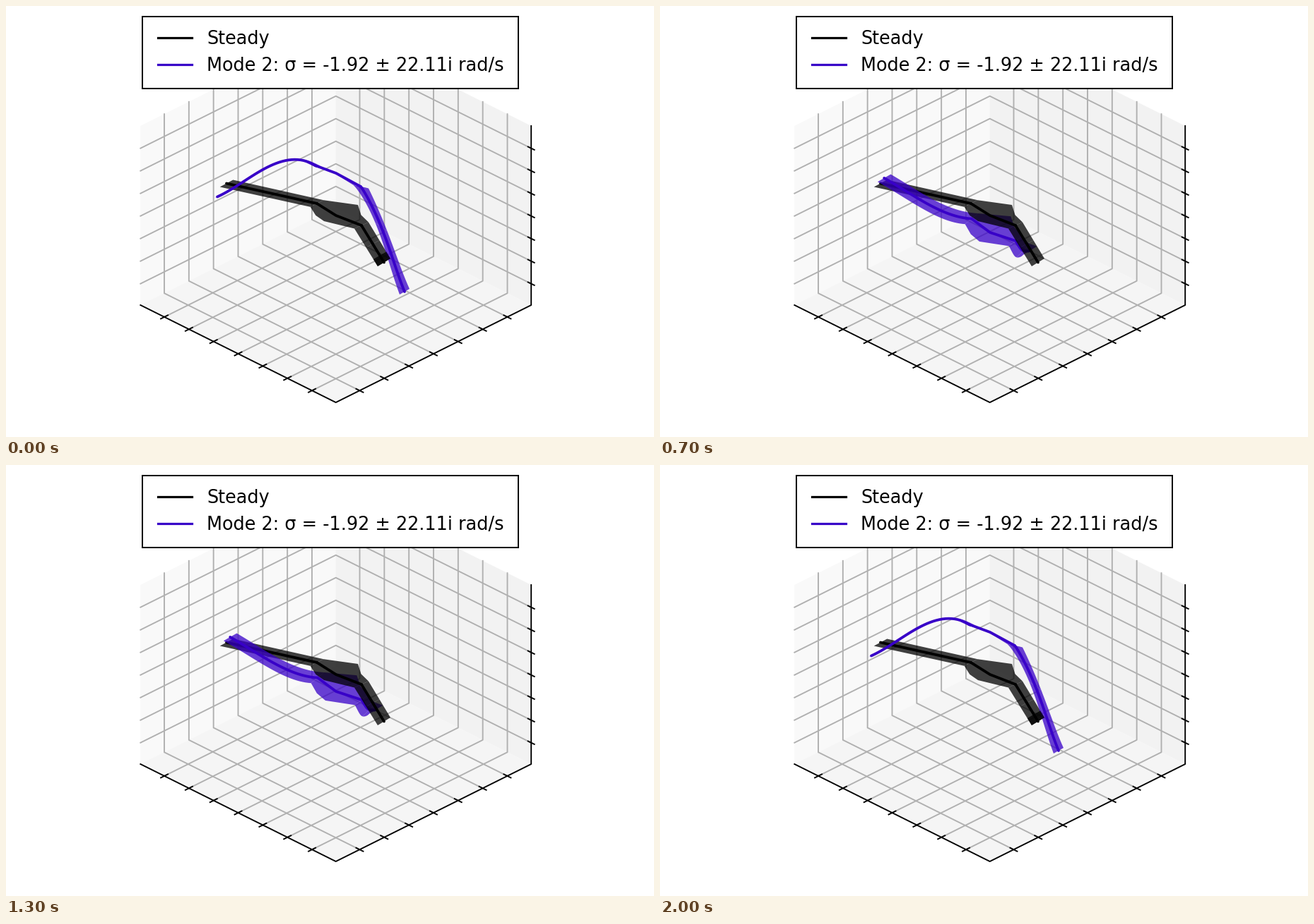
Animation, 917 px wide and 611 px high, one loop 2.05 s. Source, as a matplotlib script:

```python
import numpy as np
import matplotlib.pyplot as plt
from matplotlib.animation import FuncAnimation
from matplotlib.patches import Polygon, Rectangle

W, H, DPI = 917, 611, 100
STEPS = 41
PX = 72 / DPI
BLACK, VIOLET = "#000000", "#3800c8"

plt.rcParams["font.family"] = "DejaVu Sans"
fig = plt.figure(figsize=(W / DPI, H / DPI), dpi=DPI, facecolor="white")
ax = fig.add_axes([0, 0, 1, 1])
ax.set_xlim(0, W)
ax.set_ylim(H, 0)
ax.axis("off")


def stroke(pts, color, width, z, **kw):
    x, y = np.transpose(pts)
    return ax.plot(x, y, color=color, lw=width * PX, zorder=z, **kw)[0]


# Box corners in pixels
MID, LEFT, RIGHT = 466.75, 190.3, 743.2
DX, DY = MID - LEFT, 138
FLOOR, TOP = 424, 170


def draw_box():
    panes = [
        ("#f9f9f9", [(LEFT, FLOOR), (MID, FLOOR - DY), (MID, TOP - DY), (LEFT, TOP)]),
        ("#f2f2f2", [(RIGHT, FLOOR), (MID, FLOOR - DY), (MID, TOP - DY), (RIGHT, TOP)]),
        ("#f5f5f5", [(LEFT, FLOOR), (MID, FLOOR - DY), (RIGHT, FLOOR), (MID, FLOOR + DY)]),
    ]
    for color, pts in panes:
        ax.add_patch(Polygon(pts, fc=color, ec="none", zorder=0))

    grid = dict(color="#b0b0b0", width=1.9, z=1)
    tick = dict(color=BLACK, width=1.9, z=1.6)
    for i in range(7):
        x = 224 + 34.83 * i
        d = (x - LEFT) * DY / DX
        for side in (1, -1):
            wall = x if side == 1 else 2 * MID - x
            foot = FLOOR - d
            end = (wall + side * DX, foot + DY)
            stroke([(wall, TOP - d), (wall, foot), end], **grid)
            stroke([(end[0] - 5, end[1] - side * 2.5),
                    (end[0] + 5, end[1] + side * 2.5)], **tick)
        z = 201.7 + 32 * i
        stroke([(LEFT, z), (MID, z - DY), (RIGHT, z)], **grid)
        stroke([(RIGHT - 4.5, z - 2.2), (RIGHT + 4.5, z + 2.2)], **tick)

    stroke([(LEFT, FLOOR), (MID, FLOOR + DY), (RIGHT, FLOOR), (RIGHT, TOP)],
           BLACK, 1.9, 1.5, solid_joinstyle="round")


def draw_legend():
    ax.add_patch(Rectangle((192.5, 14.5), 532, 102.5, fc="white", ec=BLACK,
                           lw=2 * PX, zorder=10))
    rows = [(45.2, "Steady", BLACK),
            (82.6, "Mode 2: σ = -1.92 ± 22.11i rad/s", VIOLET)]
    for y, label, color in rows:
        stroke([(214.5, y), (262.5, y)], color, 3.2, 11)
        ax.text(284.5, y + 9, label, fontsize=25.5 * PX, va="baseline", zorder=11)


# Wing stations run from root (0) to tip (1)
S = np.linspace(0, 1, 33)
KNOTS = np.linspace(0, 1, 5)


def curve(*vals):
    return np.polyval(np.polyfit(KNOTS, vals, 4), S)


def wing(root, tip, move, half, twist):
    rest = np.outer(1 - S, root) + np.outer(S, tip)
    chord = np.outer(1 - S, half[0]) + np.outer(S, half[1])
    return rest, np.column_stack(move), chord, np.column_stack(twist)


PORT = wing((440, 280), (312, 251.5),
            (curve(-2.5, -4, -6.5, -9, -13), curve(-54, -55, -37, -9, 19)),
            ((9.3, -4.8), (9.3, -5)),
            (0 * S, curve(7, 4.5, 1.5, 0.3, 0.8)))
STAR = wing((503, 311), (535, 363.5),
            (curve(-1, 3, 12, 20, 29), curve(-55, -48, -24, 7, 41.5)),
            ((10, -4.5), (9, -5.5)),
            (curve(1, 0, -1, -1.5, -2), curve(7, 10, 11, 8, 1.5)))


def wing_pose(spec, a):
    rest, move, chord, twist = spec
    mid = rest + a * move
    half = chord + a * twist
    return mid - half, mid, mid + half


def ribbon(low, high):
    return np.vstack([low, high[::-1]])


def pose(a):
    """Outline and centre line of each part at amplitude a."""
    pl, pm, pu = wing_pose(PORT, a)
    sl, sm, su = wing_pose(STAR, a)
    hub = np.array([467, 297 - 60 * a])
    low = np.array([450 - 2.6 * a + 6 * a * a, 305 - 73 * a - 2 * a * a])
    high = np.array([498 - 10 * a * a, 282 - 38.3 * a + 5.3 * a * a])
    body = np.array([pl[0], (pl[0] + low) / 2 + (-2, 2), low, sl[0], sm[0],
                     su[0], (high + su[0]) / 2 + (-3, 2), high, pu[0], pm[0]])
    n = len(S) // 2
    return {
        "port": (ribbon(pl, pu), pm),
        "body": (body, np.array([pm[0], hub, sm[0]])),
        "inner": (ribbon(sl[:n + 1], su[:n + 1]), sm[:n + 1]),
        "outer": (ribbon(sl[n:], su[n:]), sm[n:]),
    }


def make_craft(color):
    craft = {}
    for name, (outline, mid) in pose(0).items():
        skin = ax.add_patch(Polygon(outline, fc=color, ec="none", alpha=0.75))
        spar = stroke(mid, color, 3.8, 3, solid_capstyle="round",
                      solid_joinstyle="round")
        craft[name] = skin, spar
    return craft


def set_layer(part, z):
    skin, spar = part
    skin.set_zorder(z)
    spar.set_zorder(z + 0.5)


draw_box()
draw_legend()
steady = make_craft(BLACK)
mode = make_craft(VIOLET)
for part in mode.values():
    set_layer(part, 3)

low, _, high = wing_pose(STAR, 0)
cap = ax.add_patch(Polygon(ribbon(low[-7:], high[-7:]), fc=BLACK, ec="none",
                           alpha=0.75, zorder=6))


def update(k):
    a = abs(k - 20) / 10 - 1  # triangle wave from 1 to -1 and back
    for name, (outline, mid) in pose(a).items():
        skin, spar = mode[name]
        skin.set_xy(outline)
        spar.set_data(mid[:, 0], mid[:, 1])
    on_top = {"port": False, "body": a < 0,
              "inner": -0.6 < a < 0, "outer": -0.6 < a < 0}
    for name, top in on_top.items():
        set_layer(steady[name], 4 if top else 2)
    cap.set_visible(a > 0)
    return []


anim = FuncAnimation(fig, update, frames=STEPS, interval=50, repeat=True,
                     repeat_delay=0, blit=False)
plt.show()
```
